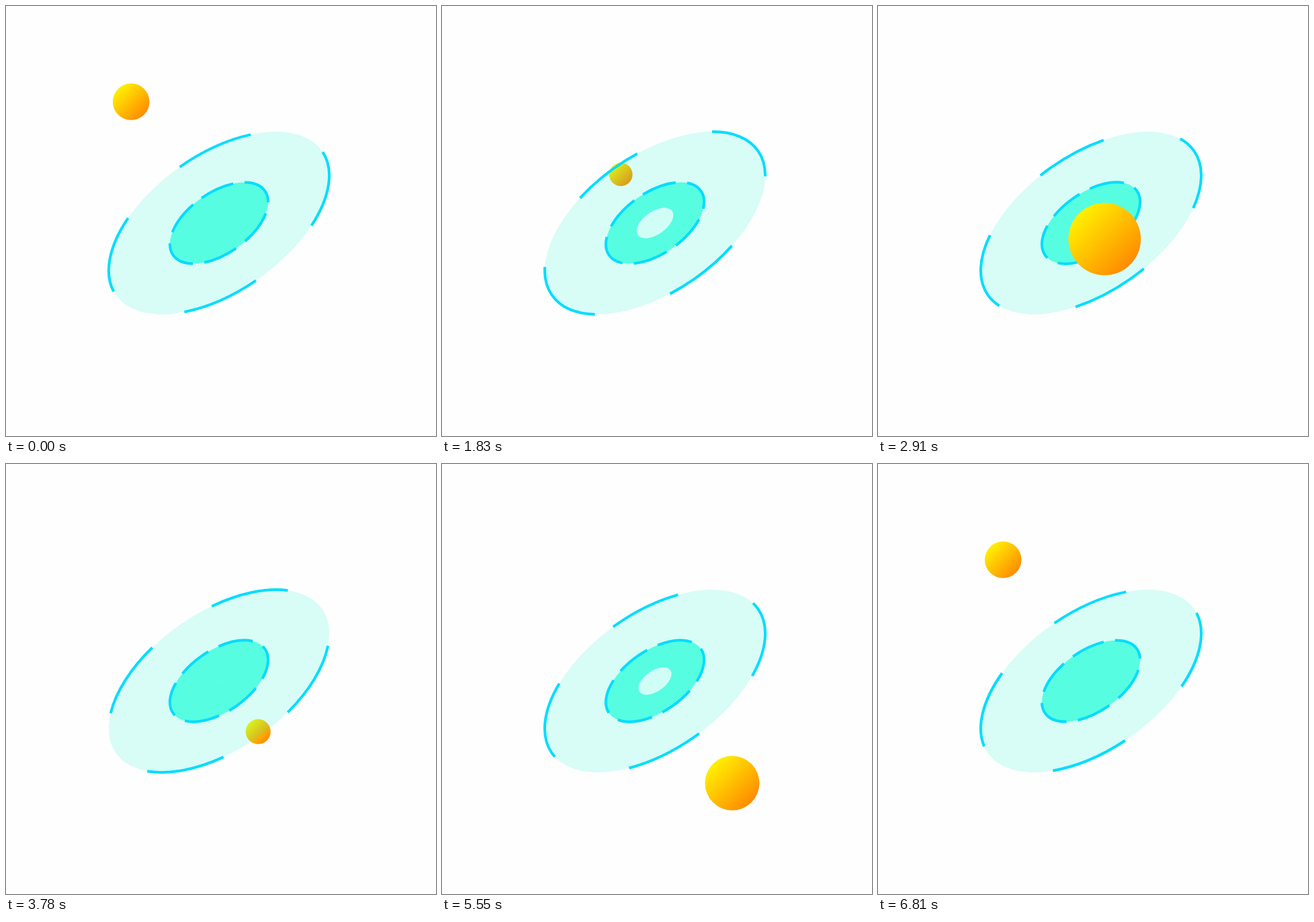
An HTML page that plays this animation: 640 by 640 pixels, repeating every 6840 ms.

```html
<!DOCTYPE html>
<html lang="en">
<head>
<meta charset="utf-8">
<title>Orbit</title>
<style>
  html, body { margin: 0; width: 100%; height: 100%; overflow: hidden; background: #fefefe; }
  svg { display: block; width: 100%; height: 100%; }
  .ring { fill: none; stroke: #00dcff; stroke-width: 4; }
</style>
</head>
<body>
<svg viewBox="0 0 640 640">
  <defs>
    <linearGradient id="sun" x1=".15" y1=".15" x2=".85" y2=".85">
      <stop offset="0" stop-color="#fff000"/>
      <stop offset="1" stop-color="#ff8c00"/>
    </linearGradient>
  </defs>
  <g id="disc" transform="translate(317 323) rotate(-35)">
    <path id="outer" fill="#00f1ca" fill-opacity=".15"/>
    <path id="outerRing" class="ring" stroke-dasharray="117 117"/>
    <path id="inner" fill="#00ffd4" fill-opacity=".6"/>
    <ellipse id="core" fill="#fff" fill-opacity=".72"/>
    <path id="innerRing" class="ring" stroke-dasharray="52 17"/>
  </g>
  <circle id="ball" fill="url(#sun)"/>
</svg>
<script>
  const LOOP = 6840;
  const ORBIT = LOOP / 3, ORBIT_END = 2250;
  const PULSE = LOOP / 2;
  const A = 187.2, B = 101.8, INNER = 0.4455;

  // Steps of [time, value], eased between neighbours.
  const path = [[0, 0], [1125, 1], [2250, 0]];
  const radius = [[0, 27.3], [485, 55.5], [1700, 15.7], [2250, 27.3]];
  const pulse = [[230, 0], [1900, 0.1675], [3050, 0]];

  const el = id => document.getElementById(id);
  const set = (node, attrs) => {
    for (const key in attrs) node.setAttribute(key, attrs[key]);
  };

  function at(steps, t) {
    if (t <= steps[0][0]) return steps[0][1];
    for (let i = 1; i < steps.length; i++) {
      const [t0, v0] = steps[i - 1], [t1, v1] = steps[i];
      if (t <= t1) {
        const u = (t - t0) / (t1 - t0);
        return v0 + (v1 - v0) * u * u * (3 - 2 * u);
      }
    }
    return steps[steps.length - 1][1];
  }

  // Starts at the end of the short axis and runs clockwise.
  function oval(k) {
    const a = A * k, b = B * k;
    return `M0 ${-b}A${a} ${b} 0 0 1 0 ${b}A${a} ${b} 0 0 1 0 ${-b}Z`;
  }

  const svg = document.querySelector("svg");
  const disc = el("disc"), ball = el("ball"), core = el("core");
  const outerRing = el("outerRing"), innerRing = el("innerRing");
  for (const id of ["outer", "outerRing"]) set(el(id), { d: oval(1) });
  for (const id of ["inner", "innerRing"]) set(el(id), { d: oval(INNER) });

  let inFront = true;
  function draw(t) {
    const p = Math.min(t % ORBIT, ORBIT_END);
    const along = at(path, p);
    set(ball, { cx: 186.2 + 255.7 * along, cy: 142.5 + 346 * along, r: at(radius, p) });

    const front = p < 1125;
    if (front !== inFront) {
      svg.insertBefore(ball, front ? null : disc);
      inFront = front;
    }

    const k = at(pulse, t % PULSE);
    set(core, { rx: A * k, ry: B * k });
    set(outerRing, { "stroke-dashoffset": 5 * 234 * t / LOOP });
    set(innerRing, { "stroke-dashoffset": -8 * 69 * t / LOOP });
  }

  const start = performance.now();
  function tick() {
    draw((performance.now() - start) % LOOP);
    requestAnimationFrame(tick);
  }
  tick();
</script>
</body>
</html>
```
